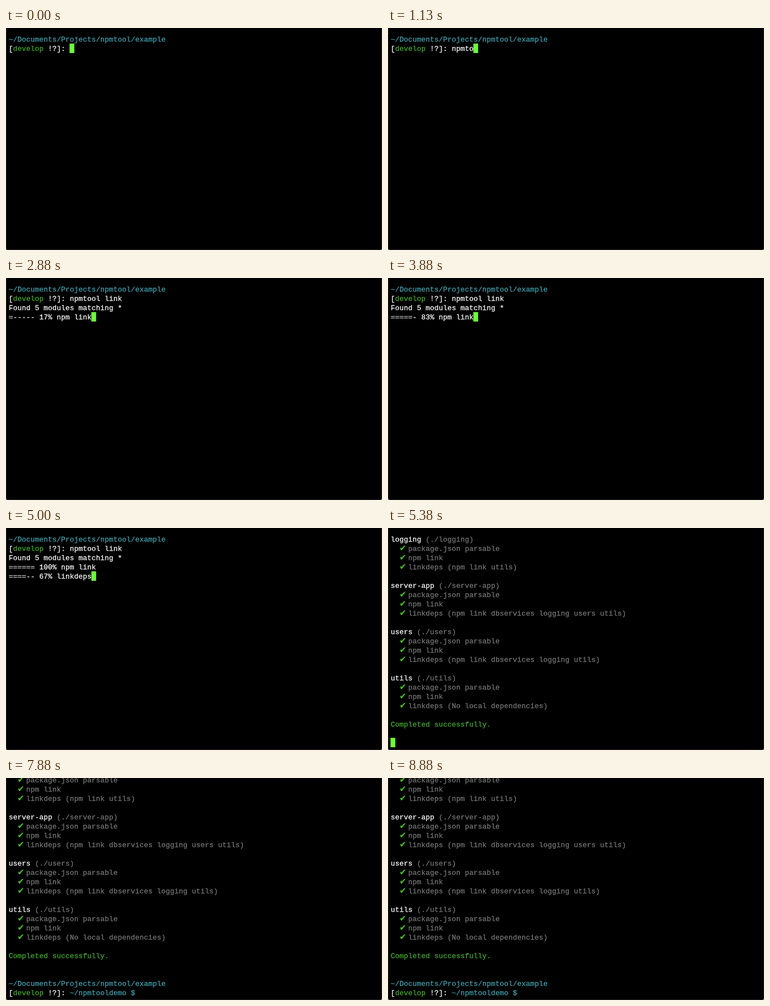
An HTML page with a canvas for the animation above (9.13 s loop, 690 by 408 pixels).

```html
<!DOCTYPE html>
<html lang="en">
<head>
<meta charset="utf-8">
<title>Terminal session</title>
<style>
  html, body { margin: 0; width: 100%; height: 100%; overflow: hidden; background: #000; }
  canvas { display: block; }
</style>
</head>
<body>
<canvas id="stage" width="690" height="408"></canvas>
<script>
const LOOP = 9130;
const CELL = 8, LINE = 17, LEFT = 5, TOP = -5, BASELINE = 13, ROWS = 24;
const MONO = '13.333px "Liberation Mono", "Courier New", monospace';
const SYMBOL = '15px "DejaVu Sans", sans-serif';
const WHITE = '#fafafa', TEAL = '#3f9fac', GREEN = '#42a82a',
      GRAY = '#747474', TICK = '#4cb82a', BLOCK = '#6dfb3b';

const ctx = document.getElementById('stage').getContext('2d');

// A line is a list of spans.
const span = (text, color = WHITE, font = MONO) => ({ text, color, font });
const plain = text => [span(text)];
const BLANK = [];
const PATH = [span('~/Documents/Projects/npmtool/example', TEAL)];

const prompt = tail => [span('['), span('develop', GREEN), span(' !?]: '), tail];

const check = text => [span('  '), span('✔ ', TICK, SYMBOL), span(text, GRAY)];

const moduleReport = (name, deps) => [
  [span(name), span(` (./${name})`, GRAY)],
  check('package.json parsable'),
  check('npm link'),
  check(`linkdeps (${deps})`),
  BLANK
];

const REPORT = [
  BLANK,
  ...moduleReport('logging', 'npm link utils'),
  ...moduleReport('server-app', 'npm link dbservices logging users utils'),
  ...moduleReport('users', 'npm link dbservices logging utils'),
  ...moduleReport('utils', 'No local dependencies'),
  [span('Completed successfully.', GREEN)],
  BLANK,
  BLANK
];
const FINISHED = [...REPORT, PATH, prompt(span('~/npmtooldemo $ ', TEAL))];

const COMMAND = 'npmtool link';
const KEYS = [250, 500, 630, 1000, 1130, 1250, 1380, 1750, 1880, 2130, 2250, 2380];
const ENTER = 2630, DONE = 5380, PROMPT = 5500, BLINK = 6880;
const LINK_STEPS = [2880, 3130, 3380, 3630, 3880, 4250];
const DEPS_STEPS = [4250, 4500, 4750, 5000];

const passed = (times, t) => times.filter(at => t >= at).length;

function progress(step, label) {
  const bar = '='.repeat(step) + '-'.repeat(6 - step);
  return plain(`${bar} ${Math.round(step * 100 / 6)}% ${label}`);
}

function screenAt(t) {
  if (t >= PROMPT) return FINISHED;
  if (t >= DONE) return REPORT;
  const lines = [BLANK, PATH, prompt(span(COMMAND.slice(0, passed(KEYS, t))))];
  const link = passed(LINK_STEPS, t), deps = passed(DEPS_STEPS, t);
  if (t >= ENTER) lines.push(link ? plain('Found 5 modules matching *') : BLANK);
  if (link) lines.push(progress(link, 'npm link'));
  if (deps) lines.push(progress(deps, 'linkdeps'));
  return lines;
}

// Draws one line and returns the x just after it.
function drawLine(line, top) {
  let x = LEFT;
  for (const { text, color, font } of line) {
    ctx.font = font;
    ctx.fillStyle = ctx.strokeStyle = color;
    ctx.fillText(text, x, top + BASELINE);
    ctx.strokeText(text, x, top + BASELINE);
    x += text.length * CELL;
  }
  return x;
}

// Black pane with a faint edge and light, rounded bottom corners.
function drawWindow() {
  ctx.fillStyle = '#888';
  ctx.fillRect(0, 0, 690, 408);
  ctx.beginPath();
  ctx.roundRect(0, -8, 690, 416, 4);
  ctx.fillStyle = '#222';
  ctx.fill();
  ctx.beginPath();
  ctx.roundRect(1, -8, 688, 415, 3);
  ctx.fillStyle = '#000';
  ctx.fill();
}

function drawCursor(x, top) {
  ctx.fillStyle = BLOCK;
  ctx.fillRect(x - 0.4, top - 0.4, CELL + 0.8, LINE + 0.4);
}

function draw(t) {
  drawWindow();
  ctx.lineWidth = 0.3;
  const lines = screenAt(t).slice(-ROWS);
  let x = LEFT;
  lines.forEach((line, row) => { x = drawLine(line, TOP + row * LINE); });

  const hidden = t >= BLINK && Math.floor((t - BLINK) / 500) % 2 === 0;
  if (!hidden) drawCursor(x, TOP + (lines.length - 1) * LINE);
}

const start = performance.now();
function tick() {
  draw((performance.now() - start) % LOOP);
  requestAnimationFrame(tick);
}
tick();
</script>
</body>
</html>
```
